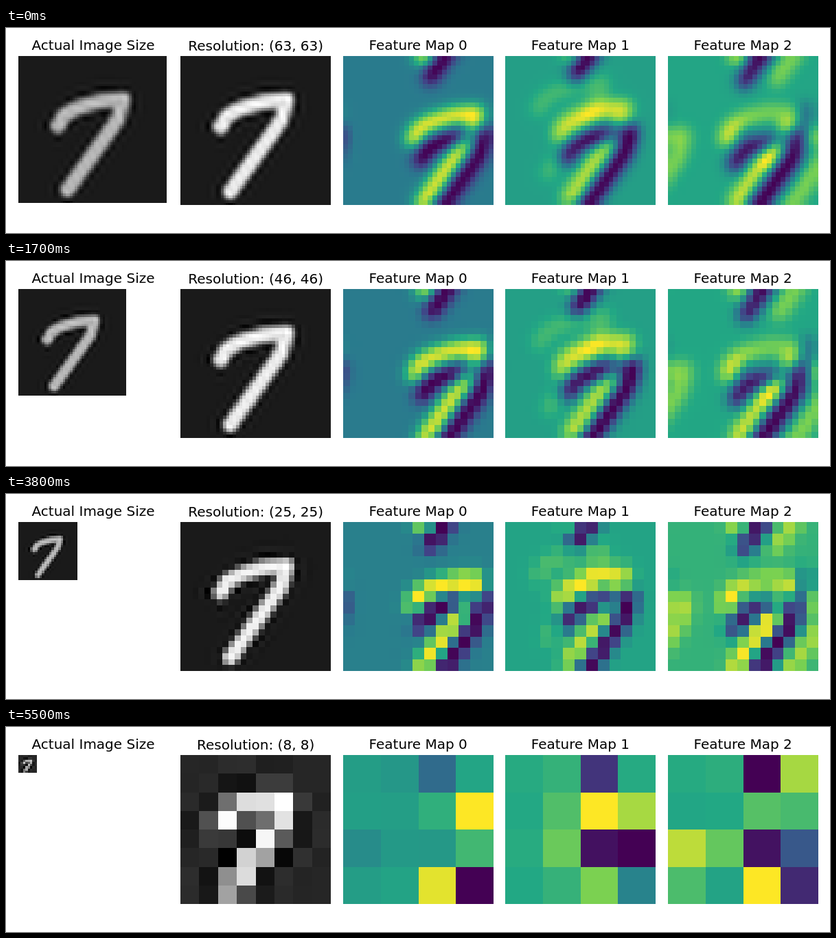
Animation, 1200 px wide and 300 px high, one loop 5600 ms. Source, as an HTML page with a canvas:

```html
<!DOCTYPE html>
<html lang="en">
<head>
<meta charset="utf-8">
<title>Feature maps by resolution</title>
<style>
  html, body { margin: 0; width: 100%; height: 100%; overflow: hidden; background: #fff; }
  canvas, svg { position: absolute; left: 0; top: 0; width: 1200px; height: 300px; }
  text { font: 20px "DejaVu Sans", Verdana, sans-serif; text-anchor: middle; fill: #000; }
</style>
</head>
<body>
<canvas id="stage" width="1200" height="300"></canvas>
<svg viewBox="0 0 1200 300">
  <text x="127" y="32">Actual Image Size</text>
  <text x="363.7" y="33" id="size">Resolution: (63, 63)</text>
  <text x="600.2" y="32">Feature Map 0</text>
  <text x="836.4" y="32">Feature Map 1</text>
  <text x="1073.2" y="32">Feature Map 2</text>
</svg>
<script>
const STEP = 100, STEPS = 56, FIRST = 63;
const TOP = 41, W = 219, H = 218;
const BASE = 28, CELL = W / BASE;
const ctx = document.getElementById('stage').getContext('2d');
const label = document.getElementById('size');

// Pen path of the digit, in cells of the base grid.
const PEN = [[7.5, 13.3], [8.8, 11.1], [11.4, 9.8], [15.5, 8.6], [19.8, 8.2], [18.7, 12.2], [9.3, 25.5]];
const RADIUS = 1.35, SOFT = .6;

// Each filter is a few spots; a spot shifts the digit by (dx, dy) px and weighs it.
const FILTERS = [
  { x: 491, spots: [{ dx: 42, dy: 19, gain: 1 }, { dx: 54, dy: 50, gain: -.8 }] },
  { x: 727, spots: [{ dx: 20, dy: 11, gain: .6 }, { dx: 30, dy: 46, gain: -1 },
                    { dx: -12, dy: -26, gain: .2 }] },
  { x: 964, spots: [{ dx: 27, dy: 17, gain: .75 }, { dx: 38, dy: 56, gain: -1 },
                    { dx: 86, dy: 52, gain: .4 }, { dx: 48, dy: 14, gain: -.4 }] }
];
const SPREAD = 9;

const VIRIDIS = ['440154', '414487', '2a788e', '22a884', '7ad151', 'fde725']
  .map(h => [0, 2, 4].map(i => parseInt(h.slice(i, i + 2), 16)));

const clamp = v => Math.min(1, Math.max(0, v));
const gray = v => `rgb(${v},${v},${v})`;
const range = values => [Math.min(...values), Math.max(...values)];

function viridis(v) {
  const last = VIRIDIS.length - 1;
  const i = Math.min(last - 1, Math.floor(v * last)), f = v * last - i;
  return `rgb(${VIRIDIS[i].map((c, k) => Math.round(c + (VIRIDIS[i + 1][k] - c) * f))})`;
}

// Values of fn(column, row) over an n by n grid.
function grid(n, fn) {
  return Array.from({ length: n * n }, (_, i) => fn(i % n, Math.floor(i / n)));
}

function ink(x, y) {
  let near = Infinity;
  for (let i = 1; i < PEN.length; i++) {
    const [ax, ay] = PEN[i - 1], [bx, by] = PEN[i];
    const dx = bx - ax, dy = by - ay;
    const t = clamp(((x - ax) * dx + (y - ay) * dy) / (dx * dx + dy * dy));
    near = Math.min(near, Math.hypot(x - ax - t * dx, y - ay - t * dy));
  }
  return clamp(.5 + (RADIUS - near) / SOFT);
}

// Mean ink over each cell, from 4 by 4 points.
const digit = grid(BASE, (c, r) => {
  const points = grid(4, (i, j) => ink(c + (i + .5) / 4, r + (j + .5) / 4));
  return points.reduce((a, b) => a + b) / points.length;
});

// Circular convolution, so what leaves one side returns on the other.
function convolve(spots) {
  const wrap = d => d - BASE * Math.round(d / BASE);
  const kernel = grid(BASE, (c, r) => spots.reduce((sum, { dx, dy, gain }) => {
    const d = Math.hypot(wrap(c - dx / CELL), wrap(r - dy / CELL)) * CELL / SPREAD;
    return sum + gain * Math.exp(-d * d / 2);
  }, 0));
  const out = new Array(BASE * BASE).fill(0);
  digit.forEach((v, i) => {
    if (!v) return;
    const c0 = i % BASE, r0 = Math.floor(i / BASE);
    kernel.forEach((k, j) => {
      const c = (c0 + j) % BASE, r = (r0 + Math.floor(j / BASE)) % BASE;
      out[r * BASE + c] += v * k;
    });
  });
  return out;
}

const maps = FILTERS.map(({ x, spots }) => ({ x, field: convolve(spots) }));

function lanczos(x, a = 4) {
  if (Math.abs(x) < 1e-6) return 1;
  if (Math.abs(x) >= a) return 0;
  const p = Math.PI * x;
  return a * Math.sin(p) * Math.sin(p / a) / (p * p);
}

function weights(n) {
  const s = Math.max(1, BASE / n);
  return Array.from({ length: n }, (_, i) => {
    const c = (i + .5) * BASE / n - .5;
    const row = Array.from({ length: BASE }, (_, j) => lanczos((j - c) / s));
    const sum = row.reduce((a, b) => a + b);
    return row.map(v => v / sum);
  });
}

// Resample a base grid to n by n, keeping every stride-th cell.
function resize(field, n, stride = 1) {
  const taps = weights(n).filter((_, i) => i % stride === 0), out = [];
  for (const wy of taps) {
    const line = wy.map((_, x) => wy.reduce((sum, w, y) => sum + w * field[y * BASE + x], 0));
    for (const wx of taps) out.push(wx.reduce((sum, w, x) => sum + w * line[x], 0));
  }
  return out;
}

function drawGrid(values, x, w, h, paint) {
  const n = Math.sqrt(values.length);
  const edge = (i, size) => Math.round(i * size / n);
  values.forEach((v, i) => {
    const c = i % n, r = Math.floor(i / n);
    const x0 = edge(c, w), y0 = edge(r, h);
    ctx.fillStyle = paint(v);
    ctx.fillRect(x + x0, TOP + y0, edge(c + 1, w) - x0, edge(r + 1, h) - y0);
  });
}

function draw(step) {
  const n = FIRST - step;
  ctx.fillStyle = '#fff';
  ctx.fillRect(0, 0, 1200, 300);
  label.textContent = `Resolution: (${n}, ${n})`;

  const image = resize(digit, n);
  const [lo, hi] = range(image);
  const back = 26 + 3 * Math.max(0, 12 - n);
  const tone = peak => v =>
    gray(Math.round(v < 0 ? back * (1 - v / lo) : back + (peak - back) * v / hi));
  const actual = n * W / 64;
  drawGrid(image, 18, Math.round(actual), Math.floor(actual - .45), tone(198));
  drawGrid(image, 254, W, H, tone(255));

  for (const { x, field } of maps) {
    const cells = resize(field, n, 2);
    const [min, max] = range(cells);
    drawGrid(cells, x, W, H, v => viridis((v - min) / (max - min)));
  }
}

let shown = -1;
const start = performance.now();
function tick() {
  const step = Math.floor((performance.now() - start) / STEP) % STEPS;
  if (step !== shown) draw(shown = step);
  requestAnimationFrame(tick);
}
tick();
</script>
</body>
</html>
```
